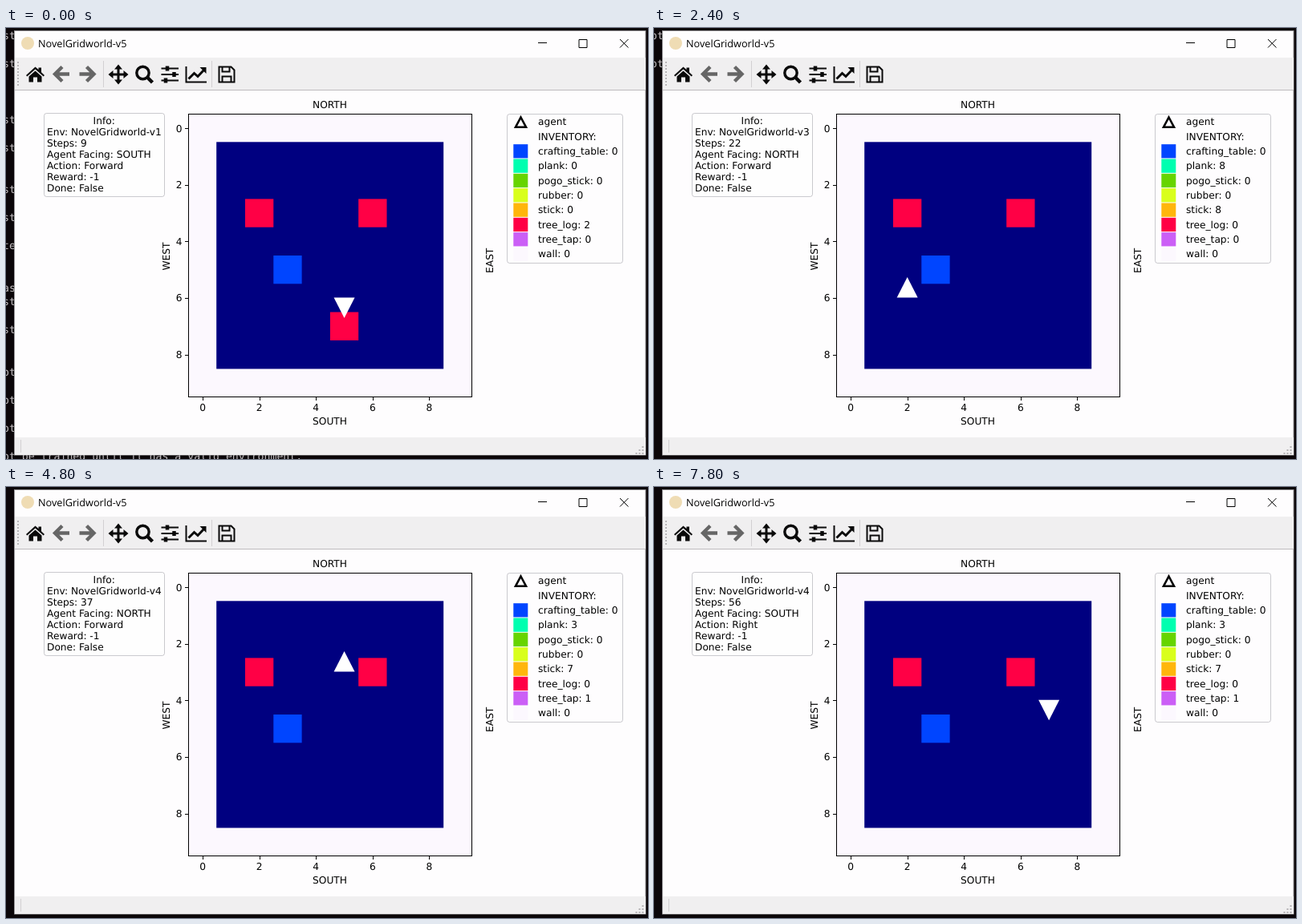
Write an HTML page that moves like this. It is 800 px wide and 538 px high and loops after 8000 ms.

```html
<!DOCTYPE html>
<html lang="en">
<head>
<meta charset="utf-8">
<title>Gridworld</title>
<style>
  html, body { margin: 0; width: 100%; height: 100%; overflow: hidden; background: #0b0609; }
  svg { display: block; width: 800px; height: 538px; }
  text { font: 12.2px "DejaVu Sans", sans-serif; fill: #000; white-space: pre; text-rendering: geometricPrecision; }
  #terminal text { font: 13.2px "DejaVu Sans Mono", monospace; fill: #c4c0c2; }
  #title { font: 12.7px "Open Sans", sans-serif; }
  #banner text { font-size: 22px; }
  .mid { text-anchor: middle; }
  .end { text-anchor: end; }
  .frame { stroke: #70707a; stroke-opacity: .36; }
  .line { fill: none; stroke: #000; }
  .icon { fill: none; stroke: #0a0a0a; stroke-width: 3; }
</style>
</head>
<body>
<svg viewBox="0 0 800 538">
  <defs>
    <clipPath id="below"><rect y="4" width="800" height="534"/></clipPath>
    <path id="arrow" d="M11 -9 L2 0 L11 9 M3 0 H20" fill="none" stroke="#666" stroke-width="4.4"/>
  </defs>
  <rect width="800" height="538" fill="#0b0609"/>
  <g clip-path="url(#below)"><g id="terminal"></g></g>

  <!-- window chrome -->
  <rect x="10.500" y="3.500" width="786.500" height="529.500" fill="#fefdfe" stroke="#99979a"/>
  <rect x="11" y="37" width="786" height="40" fill="#f0eff0"/>
  <rect x="11" y="77" width="786" height="1" fill="#bdbbbd"/>
  <rect x="11" y="511" width="786" height="22" fill="#f0eff0"/>
  <path d="M18.5 514V530M121.5 41V74M256.5 41V74" stroke="#d2d0d2"/>
  <path d="M15 42V74" stroke="#b8b6b8" stroke-width="2" stroke-dasharray="2 2"/>
  <path d="M793.5 522v10M789.5 526v6M785.5 530v2" stroke="#b4b2b4" stroke-width="2" stroke-dasharray="2 2"/>
  <circle cx="27" cy="19" r="8" fill="#efdcb4"/>
  <text id="title" x="40" y="24.3">NovelGridworld-v5</text>
  <path class="line" d="M663 18.500H674M714 14.500h10v10h-10zM765 14l10.500 10.500M775.500 14l-10.500 10.500"/>

  <!-- toolbar icons -->
  <path d="M25 59L36.500 48.500 40.500 52V49.500H44V55.300L48 59 46.700 60.500 36.500 51.500 26.300 60.500ZM28.500 60.500L36.500 53.500 44.500 60.500V67.500H39V61.500H34V67.500H28.500Z" fill="#0a0a0a"/>
  <use href="#arrow" x="59" y="57.500"/>
  <use href="#arrow" transform="translate(111.500 57.500) scale(-1 1)"/>
  <path class="icon" d="M131 58H149M140 49V67"/>
  <path d="M140 45.500l5 6h-10zM140 70.500l5-6h-10zM127.500 58l6-5v10zM152.500 58l-6-5v10z" fill="#0a0a0a"/>
  <circle class="icon" cx="170.500" cy="56" r="7.700" style="stroke-width:3.400"/>
  <path class="icon" d="M176 61.500L182.500 68" style="stroke-width:4.500"/>
  <path class="icon" d="M193.500 50.500H215M193.500 58H215M193.500 65.500H215" style="stroke-width:2.200"/>
  <path class="icon" d="M201 47.500v6M209.500 55v6M199 62.500v6" style="stroke-width:4.500"/>
  <path class="icon" d="M224.500 48V67.500H250" style="stroke-width:2"/>
  <path class="icon" d="M227.500 63.500L234.500 56.500 239 60.500 247 52"/>
  <path d="M241.500 49H249.500V57Z" fill="#0a0a0a"/>
  <path class="icon" d="M265.500 48.500H280.500L284.500 52.500V67.500H265.500ZM269.500 49V54.500H278.500V49M269.500 67V60.500H280.500V67" style="stroke-width:2"/>

  <!-- plot -->
  <rect x="227.500" y="107.500" width="353" height="353" fill="#fcf8fe"/>
  <rect x="262.200" y="142.300" width="283" height="283.200" fill="#000080"/>
  <g id="cells"></g>
  <path id="agent" d="M-13 0L0 -25.500L13 0Z" fill="#fff"/>
  <rect class="line" x="227.500" y="107.500" width="353" height="353"/>
  <g id="ticks"></g>
  <text class="mid" x="403.500" y="100.300">NORTH</text>
  <text class="mid" x="403.500" y="495.300">SOUTH</text>
  <text class="mid" transform="translate(203.600 285) rotate(-90)">WEST</text>
  <text class="mid" transform="translate(606.700 290.300) rotate(-90)">EAST</text>

  <g id="info">
    <rect id="infoBox" class="frame" x="47.500" y="106.500" height="104" rx="3" fill="#fff" fill-opacity=".2"/>
  </g>
  <rect class="frame" x="624.500" y="107.500" width="144" height="186" rx="3" fill="#fefdfe"/>
  <path class="line" d="M641.500 111.500L648 123.700H635Z" stroke-width="2.600"/>
  <g id="legend"></g>

  <g id="banner">
    <rect x="234.500" y="278.500" width="347.500" height="34" rx="6.500" fill="#fff" stroke="#000" stroke-width="1.300"/>
    <text x="241.500" y="301.200"></text>
  </g>
</svg>
<script>
const $ = id => document.getElementById(id);

function add(parent, tag, attrs, label = '') {
  const node = document.createElementNS('http://www.w3.org/2000/svg', tag);
  for (const key in attrs) node.setAttribute(key, attrs[key]);
  node.textContent = label;
  return parent.appendChild(node);
}

const CELL = 35.3, SLOT = 200, FIRST_STEP = 9, LAST_STILL_TREE_STEP = FIRST_STEP;
const px = col => 227.4 + CELL * (col + .5);
const py = row => 107.5 + CELL * (row + .5);

const COLORS = {
  crafting_table: '#0045ff', plank: '#00ffb0', pogo_stick: '#66d400', rubber: '#d9ff1c',
  stick: '#ffb60c', tree_log: '#ff0045', tree_tap: '#cb5ff6', wall: '#fcf8fe'
};
const ACTIONS = {
  F: 'Forward', L: 'Left', R: 'Right', B: 'Break', P: 'Craft_plank',
  S: 'Craft_stick', T: 'Craft_tree_tap', X: 'Place_tree_tap_Extract_rubber'
};
const GAINS = {
  B: { tree_log: 1 }, P: { tree_log: -1, plank: 4 },
  S: { plank: -2, stick: 4 }, T: { plank: -5, stick: -1, tree_tap: 1 }
};
const HEADINGS = ['NORTH', 'EAST', 'SOUTH', 'WEST'];
const MOVES = 'BPPPSSFRFFFRFRFLTFRFLFXRFLFFFRFRRFLFFFFLLFFRFFR';
const WINS = [10, 15, 26];
const UNSEEN = [20, 24, 29, 34, 38, 42, 47, 52];
const BLOCKS = ['2,3', '6,3', '3,5'];

function simulate() {
  let now = {
    step: FIRST_STEP, col: 5, row: 6, heading: 2, action: 'Forward', reward: -1,
    env: 1, done: false, items: { tree_log: 2 }
  };
  const states = [now];
  for (const move of MOVES) {
    const step = now.step + 1, done = WINS.includes(step), items = { ...now.items };
    const gains = GAINS[move] || {};
    for (const name in gains) items[name] = (items[name] || 0) + gains[name];
    let { col, row, heading } = now;
    if (move === 'L') heading = (heading + 3) % 4;
    if (move === 'R') heading = (heading + 1) % 4;
    if (move === 'F') {
      const nextCol = col + [0, 1, 0, -1][heading], nextRow = row + [-1, 0, 1, 0][heading];
      if (!BLOCKS.includes(nextCol + ',' + nextRow)) [col, row] = [nextCol, nextRow];
    }
    now = {
      step, col, row, heading, items, done, action: ACTIONS[move],
      reward: done ? 50 : GAINS[move] ? 10 : -1,
      env: 1 + WINS.filter(win => win < step).length
    };
    states.push(now);
  }
  return states.filter(state => !UNSEEN.includes(state.step));
}

const addCell = (col, row, fill) => add($('cells'), 'rect', {
  x: px(col) - CELL / 2, y: py(row) - CELL / 2, width: CELL, height: CELL, fill
});
addCell(2, 3, COLORS.tree_log);
addCell(6, 3, COLORS.tree_log);
addCell(3, 5, COLORS.crafting_table);
const lowTree = addCell(5, 7, COLORS.tree_log);

for (let n = 0; n < 10; n += 2) {
  const x = Math.round(px(n)) + .5, y = Math.round(py(n)) + .5;
  add($('ticks'), 'path', { class: 'line', d: `M${x} 461v4M227 ${y}h-4` });
  add($('ticks'), 'text', { class: 'mid', x: px(n), y: 477.7 }, n);
  add($('ticks'), 'text', { class: 'end', x: 219.5, y: py(n) + 4.5 }, n);
}

const legendY = i => 121.4 + 18.33 * i;
add($('legend'), 'text', { x: 663, y: legendY(0) }, 'agent');
add($('legend'), 'text', { x: 663, y: legendY(1) }, 'INVENTORY:');
const counters = Object.keys(COLORS).map((name, i) => {
  const y = legendY(i + 2);
  add($('legend'), 'rect', { x: 632.3, y: y - 12.9, width: 18, height: 17.3, fill: COLORS[name] });
  return { name, node: add($('legend'), 'text', { x: 663, y }) };
});

const infoLines = Array.from({ length: 7 }, (_, i) =>
  add($('info'), 'text', { x: i ? 51 : 108.6, y: 119.6 + 14.1 * i }));

// Scrolling console behind the window: [lines above the last one, visible text]
const CONSOLE = [
  [0, 'ot be trained until it has a valid environment.'], [2, 'ot'], [4, 'ot'], [6, 'ot'],
  [9, 'st'], [11, 'st'], [12, 'as'], [15, 'te'], [17, 'st'], [19, 'st'],
  [22, 'st'], [24, 'st'], [28, 'st'], [30, 'st']
];
for (const [up, label] of CONSOLE) {
  add($('terminal'), 'text', { x: -4, y: 4.5 - 17.5 * up }, label);
}

function show(state) {
  const { step, col, row, heading, env, action, reward, done, items } = state;
  [
    'Info:', `Env: NovelGridworld-v${env}`, `Steps: ${step}`, `Agent Facing: ${HEADINGS[heading]}`,
    `Action: ${action}`, `Reward: ${reward}`, `Done: ${done ? 'True' : 'False'}`
  ].forEach((label, i) => infoLines[i].textContent = label);
  $('infoBox').setAttribute('width', action === ACTIONS.X ? 239 : 150);
  for (const { name, node } of counters) node.textContent = `${name}: ${items[name] || 0}`;
  $('agent').setAttribute('transform', `translate(${px(col)} ${py(row) - .5}) rotate(${heading * 90})`);
  lowTree.style.display = step <= LAST_STILL_TREE_STEP ? '' : 'none';
  $('banner').style.display = done ? '' : 'none';
  $('banner').lastElementChild.textContent = `YOU WIN NovelGridworld-v${env}!!!`;
  const scroll = step === FIRST_STEP ? 534 : 394 - 35 * (step - 12);
  $('terminal').setAttribute('transform', `translate(0 ${scroll})`);
}

const states = simulate();
let shown = -1;
function tick() {
  const slot = Math.floor(performance.now() / SLOT) % states.length;
  if (slot !== shown) show(states[shown = slot]);
  requestAnimationFrame(tick);
}
tick();
</script>
</body>
</html>
```
